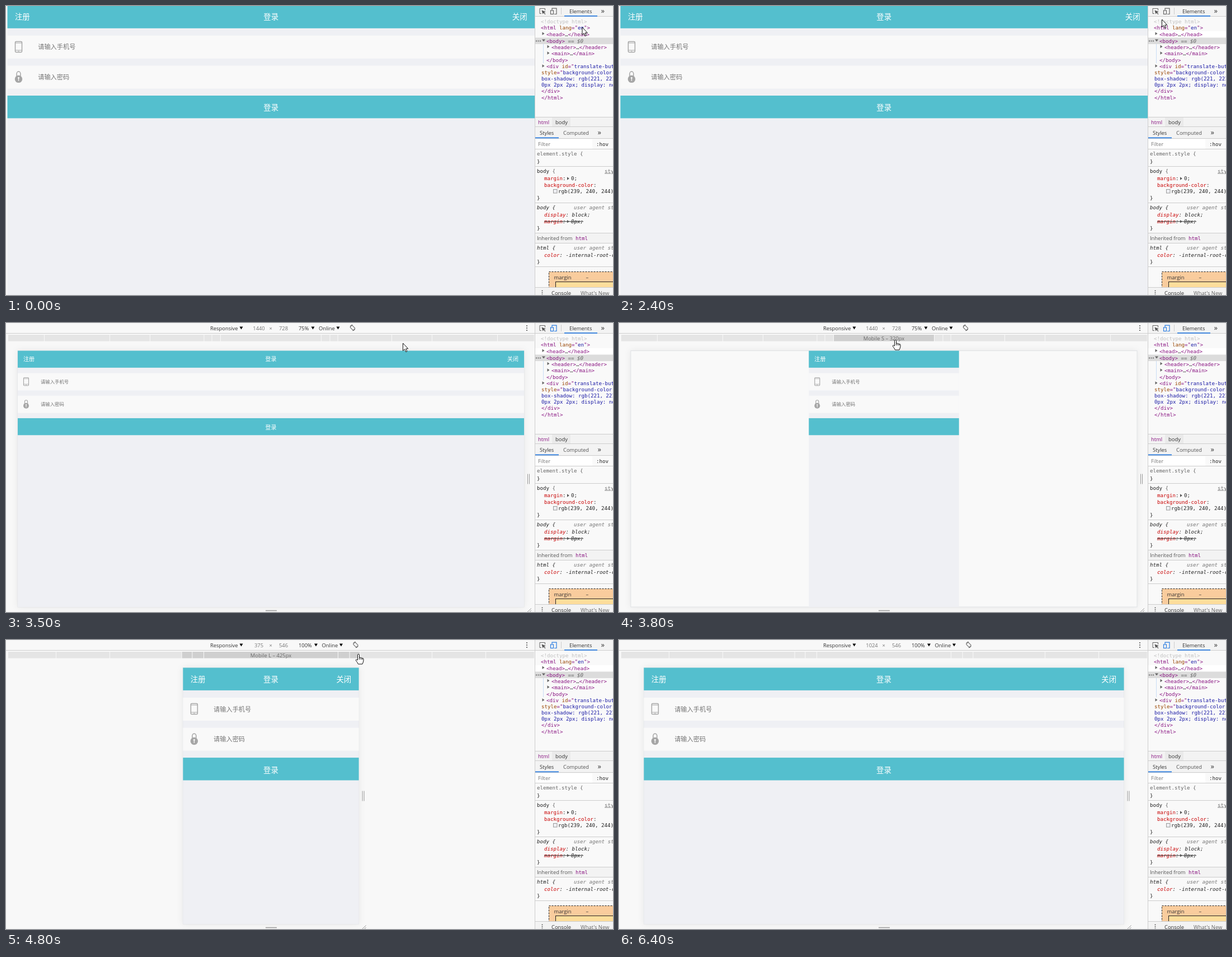
Write an HTML page that moves like this. It is 1085 px wide and 516 px high and loops after 6800 ms.

```html
<!DOCTYPE html>
<html lang="zh">
<head>
<meta charset="utf-8">
<style>
html, body { margin: 0; width: 100%; height: 100%; overflow: hidden; background: #f8f8f8; }
svg { display: block; width: 1085px; height: 516px; }
text { white-space: pre; font: 9.4px "Open Sans", "Noto Sans", sans-serif; fill: #333; }
.mono text { font: 9.15px "DejaVu Sans Mono", monospace; fill: #222; }
.mono .it { font-style: italic; }
.tag, .mono text.tag { fill: #881280; }
.attr { fill: #994500; }
.val { fill: #1a1aa6; }
.prop { fill: #c80000; }
.dim, .mono text.dim { fill: #777; }
.line { stroke: #cdcdcd; fill: none; }
.bar { fill: #f3f3f3; }
.blue { fill: #2b7de1; }
#page text { font: 13.4px "Noto Sans CJK SC", "Noto Sans CJK", sans-serif; fill: #fff; }
#page .side { font-weight: 500; }
#page .hint { font-size: 11.2px; fill: #757575; }
.teal { fill: #54bfce; }
.row { fill: #f9f9f9; }
.icon { stroke: #a6a6a6; fill: none; stroke-width: 1.5; }
#frame { fill: #f9f9f9; stroke: #dfe1e4; filter: drop-shadow(0 0 6px rgba(0,0,0,.07)); }
.grip { stroke: #999; fill: none; }
.caret { fill: #222; }
#bar text { fill: #666; text-anchor: middle; }
.pointer path { fill: #fff; stroke: #111; stroke-width: 1; stroke-linejoin: round; }
#ibeam path { fill: none; stroke: #333; }
</style>
</head>
<body>
<svg viewBox="0 0 1085 516">
  <defs><clipPath id="left"><rect width="945" height="516"/></clipPath></defs>
  <g clip-path="url(#left)">
    <rect width="945" height="516" fill="#f8f8f8"/>
    <rect id="frame" y="49.5" height="457.5"/>
    <g id="page">
      <rect class="full" id="body" fill="#eff0f4"/>
      <rect class="full teal" height="40.4"/>
      <rect class="full row" y="53.5" height="41"/>
      <rect class="full row" y="107.2" height="41"/>
      <rect class="full teal" id="submit" y="160.6" height="40.4"/>
      <text class="side" x="13.4" y="25">注册</text>
      <text class="mid late" y="25" text-anchor="middle">登录</text>
      <text class="side late" id="close" y="25" text-anchor="end">关闭</text>
      <text class="hint" x="54.7" y="78">请输入手机号</text>
      <text class="hint" x="54.7" y="131.6">请输入密码</text>
      <text class="mid late" y="187" text-anchor="middle">登录</text>
      <g class="icon">
        <rect x="14" y="64" width="12" height="19" rx="1.6"/>
        <path d="M14 66.6H26M14 79.6H26" stroke-width="1"/>
        <path d="M19 81.4H21" stroke-width="1.2"/>
        <path d="M16.6 126V121.3a3.4 3.6 0 0 1 6.8 0V126"/>
        <circle cx="20" cy="131" r="6.7" fill="#a6a6a6" stroke="none"/>
        <path d="M20 129V134.5" stroke="#f6f6f6" stroke-width="1.4"/>
        <circle cx="20" cy="128.8" r="1.5" fill="#f6f6f6" stroke="none"/>
      </g>
      <rect class="caret" id="caret1" x="54.7" y="67.6" width="1" height="12.4"/>
      <rect class="caret" id="caret2" x="54.7" y="121.4" width="1" height="12.4"/>
    </g>
    <g id="device">
      <rect width="945" height="34" fill="#f8f8f8"/>
      <path class="line" d="M0 18.5H945"/>
      <text x="365" y="13">Responsive</text>
      <path d="M417.5 6.5h6l-3 5z"/>
      <text class="dim" id="wide" x="452" y="13" text-anchor="middle"></text>
      <text class="dim" x="470.5" y="13">×</text>
      <text class="dim" id="high" x="488" y="13"></text>
      <text id="zoom" x="523" y="13"></text>
      <g id="online">
        <path d="M-13.5 6.5h6l-3 5z"/>
        <text y="13">Online</text>
        <path d="M31.5 6.5h6l-3 5z"/>
        <g fill="none" stroke="#666">
          <rect x="-2.6" y="-4" width="5.2" height="8" rx="1" transform="translate(60.5 8.5) rotate(-45)"/>
          <path d="M56 6a5 5 0 0 1 4.5-2.8M65 11a5 5 0 0 1-4.500 2.800"/>
        </g>
      </g>
      <g fill="#555"><circle cx="931" cy="5" r="1.1"/><circle cx="931" cy="9" r="1.1"/><circle cx="931" cy="13" r="1.1"/></g>
      <g id="bar"></g>
      <path class="grip" id="side" d="M6.500 269.500V287.500M9.500 269.500V287.500"/>
      <g id="ends">
        <path class="grip" d="M464 513.500H484" stroke-width="1.500"/>
        <path class="grip" id="corner" d="M6 516L13 509.500M10 516L13 513"/>
      </g>
      <g id="size">
        <rect x="832.500" y="50" width="93.500" height="20.500" fill="#deeff3"/>
        <text x="838" y="64.500" style="font-size:11.3px">1080px × 546px</text>
      </g>
    </g>
  </g>

  <g id="tools">
    <rect x="945" width="140" height="516" fill="#f9f9f9"/>
    <g class="bar">
      <rect x="945" width="140" height="18"/>
      <rect x="945" y="198" width="140" height="38"/>
      <rect x="945" y="405" width="140" height="18"/>
    </g>
    <rect id="headRow" x="946" y="45" width="139" height="11.500"/>
    <rect x="946" y="56.500" width="139" height="11.500" fill="#dcdcdc"/>
    <rect x="976" y="199" width="33" height="16" fill="#eaeaea"/>
    <rect x="946" y="238" width="102" height="17" fill="#fff"/>
    <path class="line" d="M945.500 0V516M945 18.500H1085M945 198.500H1085M945 215.500H1085M945 236.500H1085M945 255.500H1085M945 286.500H1085M945 351.500H1085M945 405.500H1085M945 423.500H1085M945 465.500H1085M992.500 3V15"/>
    <path d="M960.500 68V102" stroke="#c9def5"/>
    <rect class="blue" x="998" y="17" width="59" height="1.700"/>
    <rect class="blue" x="946" y="234.500" width="42" height="1.700"/>

    <path d="M957 13.500H954V4.500H963.500V8" fill="none" stroke="#666"/>
    <path d="M957.500 7.500L965 10.500L962 11.500L964.500 14.500L963.500 15.300L961 12.300L959.300 14.500Z" fill="#555"/>
    <rect id="hoverIcon" x="970" y="0" width="18.500" height="18" fill="#e8e8e8"/>
    <g id="toggle" fill="none" stroke-width="1.200">
      <path d="M976 7V4.200H984V14.500H980"/>
      <rect x="973.500" y="8" width="5" height="6.500"/>
    </g>
    <text x="1007" y="13">Elements</text>
    <text x="1063.500" y="13" style="font-size:13px">»</text>
    <text x="954" y="230">Styles</text>
    <text x="996" y="230" style="fill:#555">Computed</text>
    <text x="1057.500" y="230" style="font-size:13px">»</text>
    <text class="tag" x="951" y="211">html</text>
    <text x="982" y="211">body</text>
    <text class="dim" x="951" y="250">Filter</text>
    <text x="949" y="418" style="fill:#555">Inherited from</text>

    <g class="mono">
      <text x="956" y="30.500" style="fill:#c0c0c0">&lt;!doctype html&gt;</text>
      <text class="tag" x="956" y="42">&lt;html <tspan class="attr">lang</tspan>="<tspan class="val">en</tspan>"&gt;</text>
      <text class="tag" x="966" y="53.500">&lt;head&gt;<tspan fill="#333">…</tspan>&lt;/head&gt;</text>
      <text class="tag" x="966" y="65.500">&lt;body&gt;<tspan class="it" fill="#666"> == $0</tspan></text>
      <text class="tag" x="975" y="77">&lt;header&gt;<tspan fill="#333">…</tspan>&lt;/header&gt;</text>
      <text class="tag" x="975" y="88">&lt;main&gt;<tspan fill="#333">…</tspan>&lt;/main&gt;</text>
      <text class="tag" x="966" y="100">&lt;/body&gt;</text>
      <text class="tag" x="966" y="111">&lt;div <tspan class="attr">id</tspan>="<tspan class="val">translate-button</tspan>"</text>
      <text class="tag" x="957" y="122"><tspan class="attr">style</tspan>="<tspan class="val">background-color:</tspan></text>
      <text x="957" y="133"><tspan class="val">box-shadow: rgb(221, 221,</tspan></text>
      <text x="957" y="144"><tspan class="val">0px 2px 2px; display: none;</tspan></text>
      <text class="tag" x="957" y="155">&lt;/div&gt;</text>
      <text class="tag" x="957" y="166.500">&lt;/html&gt;</text>
      <path d="M958.500 46.500l4 2.800l-4 2.800zM958 59.500h6l-3 4zM967.500 69.700l4 2.800l-4 2.800zM967.500 81.200l4 2.800l-4 2.800zM958.500 104.200l4 2.800l-4 2.800z" fill="#666"/>
      <path d="M947 62.500h2m1.500 0h2m1.500 0h2" stroke="#777" stroke-width="1.800"/>

      <text x="1055" y="250" font-weight="600">:hov</text>
      <text x="949" y="267"><tspan fill="#666">element.style {</tspan></text>
      <text x="949" y="281">}</text>
      <text x="949" y="297.500">body <tspan fill="#666">{</tspan></text>
      <text class="dim" x="1070" y="297.500" text-decoration="underline">style</text>
      <text x="962" y="311"><tspan class="prop">margin</tspan>:</text>
      <text x="1010" y="311">0;</text>
      <text x="962" y="322.500"><tspan class="prop">background-color</tspan>:</text>
      <rect x="978.500" y="327.500" width="6.500" height="6.500" fill="#eff0f4" stroke="#999"/>
      <text x="987" y="334">rgb(239, 240, 244);</text>
      <text x="949" y="346">}</text>
      <text class="it" x="949" y="363">body {</text>
      <text class="it dim" x="1015" y="363">user agent stylesheet</text>
      <text class="it" x="962" y="376"><tspan class="prop">display</tspan>: block;</text>
      <text class="it" x="962" y="388"><tspan class="prop">margin</tspan>:</text>
      <text class="it" x="1010" y="388">8px;</text>
      <path d="M962 384.800H1032" stroke="#333"/>
      <text x="949" y="400">}</text>
      <path d="M1003 305.300l3.800 2.700l-3.800 2.700zM1003 382l3.800 2.700l-3.800 2.700z" fill="#555"/>
      <text class="tag" x="1018" y="418">html</text>
      <text class="it" x="949" y="435">html {</text>
      <text class="it dim" x="1015" y="435">user agent stylesheet</text>
      <text class="it" x="962" y="448"><tspan class="prop">color</tspan>: -internal-root-color;</text>
      <text x="949" y="460">}</text>
    </g>
    <rect x="970.500" y="474.500" width="140" height="60" fill="#f9cc9d" stroke="#222" stroke-dasharray="3 2"/>
    <rect x="982.500" y="492.500" width="120" height="40" fill="#fddd9b" stroke="#222"/>
    <text x="979.500" y="488">margin</text>
    <text x="1036.500" y="488">–</text>
    <rect class="bar" x="946" y="502" width="139" height="14"/>
    <path class="line" d="M946 502.500H1085"/>
    <g fill="#555"><circle cx="958.500" cy="508.500" r="1"/><circle cx="958.500" cy="512.300" r="1"/><circle cx="958.500" cy="516" r="1"/></g>
    <text x="975" y="516">Console</text>
    <text x="1027" y="516" style="fill:#666">What's New</text>
  </g>

  <g class="pointer">
    <g id="arrow"><path d="M0 0V13.500L3.100 10.700L5.300 15.600L7.400 14.600L5.300 9.900H9.300Z"/></g>
    <g id="hand"><path d="M-1.500 1.200Q0 -1 1.500 1.200V6.500Q3.200 5.200 4.300 7Q6 6 6.800 7.600Q8.700 7 9 9V12Q8.500 15 7 18H-.5Q-2 14.500 -4.300 12Q-5.300 9.800 -3.500 9.600L-1.500 11Z"/><path d="M1.500 6.500V10M4.300 7V10M6.800 7.600V10.300"/></g>
    <g id="ibeam"><path d="M-3 -6.500H-1Q0 -6.500 0 -5.500Q0 -6.500 1 -6.500H3M0 -5.500V5.500M-3 6.500H-1Q0 6.500 0 5.500Q0 6.500 1 6.500H3"/></g>
  </g>
</svg>
<script>
const LOOP = 6800, MID = 473.5, SCALE = .838;
const $ = id => document.getElementById(id);
const all = sel => document.querySelectorAll(sel);
const set = (el, attrs) => { for (const k in attrs) el.setAttribute(k, attrs[k]); };
const show = (el, on) => { el.style.display = on ? '' : 'none'; };
const move = (el, x, y) => set(el, { transform: `translate(${x} ${y})` });

const sizes = [[320, 'Mobile S'], [375, 'Mobile M'], [425, 'Mobile L'], [768, 'Tablet'],
  [1024, 'Laptop'], [1440, 'Laptop L'], [2560, '4K']];

// start time, viewport width, viewport height, zoom, content width
const views = [[2600, 1440, 728, .75, 1440], [3800, 1440, 728, .75, 427], [3900, 320, 546, 1],
  [4600, 375, 546, 1], [5000, 425, 546, 1], [5400, 768, 546, 1], [5900, 1024, 546, 1]];

// time, x, y of the pointer
const path = [[0, 1030, 38], [100, 985, 48], [200, 900, 56], [300, 874, 65], [400, 874, 65],
  [500, 874, 61], [700, 874, 70], [900, 870, 106], [1000, 874, 128], [1100, 874, 131],
  [1200, 874, 131], [1400, 858, 163], [1600, 847, 177], [1800, 847, 177], [2100, 920, 95],
  [2300, 962, 35], [2500, 979, 13], [3200, 979, 13], [3300, 925, 36], [3700, 494, 36],
  [3800, 494, 30], [3900, 494, 30], [4400, 603, 28], [4500, 603, 28], [4600, 603, 28],
  [4800, 630, 25], [5000, 630, 25], [5200, 715, 25], [5400, 715, 25], [5700, 805, 27],
  [6000, 805, 27], [6300, 1060, 80], [6400, 1090, 98], [LOOP, 1090, 98]];

function pointerAt(t) {
  const i = path.findIndex(p => p[0] > t), a = path[i - 1], b = path[i];
  const f = (t - a[0]) / (b[0] - a[0]);
  return [a[1] + (b[1] - a[1]) * f, a[2] + (b[2] - a[2]) * f];
}

function drawPage(x, y, w, h, k) {
  set($('page'), { transform: `translate(${x} ${y}) scale(${k})` });
  all('.full').forEach(el => set(el, { width: w / k }));
  set($('body'), { height: h / k });
  all('.mid').forEach(el => set(el, { x: w / k / 2 }));
  set($('close'), { x: w / k - 13.4 });
}

function drawBar(zoom, over, x) {
  const half = sizes.map(s => s[0] * .375 * zoom);
  const hit = over ? half.findIndex(r => Math.abs(x - MID) < r) : -1;
  let out = '';
  const seg = (a, b, on) => {
    a = Math.max(a, 4); b = Math.min(b, 944);
    if (b > a) out += `<rect x="${a}" y="21" width="${b - a}" height="11.5" fill="${on ? '#cfcfcf' : '#e5e5e5'}"/>`;
  };
  half.forEach((r, i) => {
    const on = i <= hit;
    if (!i) return seg(MID - r + .5, MID + r - .5, on);
    seg(MID - r + .5, MID - half[i - 1] - .5, on);
    seg(MID + half[i - 1] + .5, MID + r - .5, on);
  });
  if (hit >= 0) out += `<text x="${MID}" y="31">${sizes[hit][1]} – ${sizes[hit][0]}px</text>`;
  $('bar').innerHTML = out;
}

function draw(t) {
  const [x, y] = pointerAt(t);
  const view = views.filter(v => v[0] <= t).pop();
  const overBar = !!view && x < 944 && y > 20 && y < 33;
  const overInput = !view && x < 945 && (y > 58 && y < 89 || y > 112 && y < 143);

  const kind = overBar ? 'hand' : overInput ? 'ibeam' : 'arrow';
  for (const id of ['arrow', 'hand', 'ibeam']) show($(id), id === kind);
  move($(kind), x, y);

  show($('caret1'), t >= 500 && t < 1200);
  show($('caret2'), t >= 1200 && t < 1500);
  $('submit').style.fill = t === 1500 ? '#4cb3c2' : '';
  const overHead = x > 946 && y > 45 && y < 56.5;
  set($('headRow'), { fill: overHead ? '#e8f0fb' : t < 100 ? '#f9f9f9' : '#fff' });
  show($('hoverIcon'), t >= 2500 && t < 3300);
  set($('toggle'), { stroke: view ? '#2b7de1' : '#666' });

  show($('device'), view);
  show($('frame'), view);
  if (!view) {
    drawPage(2.5, -.6, 942.5, 520, 1);
  } else {
    const [, px, high, zoom, content = px] = view;
    const w = px * SCALE * zoom, inner = content * SCALE * zoom, right = MID + w / 2;
    set($('frame'), { x: MID - w / 2, width: w });
    drawPage(MID - inner / 2, 49.5, inner, 457.5, zoom);
    drawBar(zoom, overBar, x);
    $('wide').textContent = px;
    $('high').textContent = high;
    $('zoom').textContent = zoom * 100 + '%';
    move($('online'), zoom < 1 ? 559 : 564.5, 0);
    move($('side'), right, 0);
    move($('corner'), right, 0);
    show($('size'), t < 3200);
    show($('ends'), t >= 3200);
  }
  const settling = !!view && view[0] === 3800;
  all('.late').forEach(el => show(el, !settling));
}

let last = -1;
function tick() {
  const t = Math.floor(performance.now() % LOOP / 100) * 100;
  if (t !== last) draw(last = t);
  requestAnimationFrame(tick);
}
tick();
</script>
</body>
</html>
```
